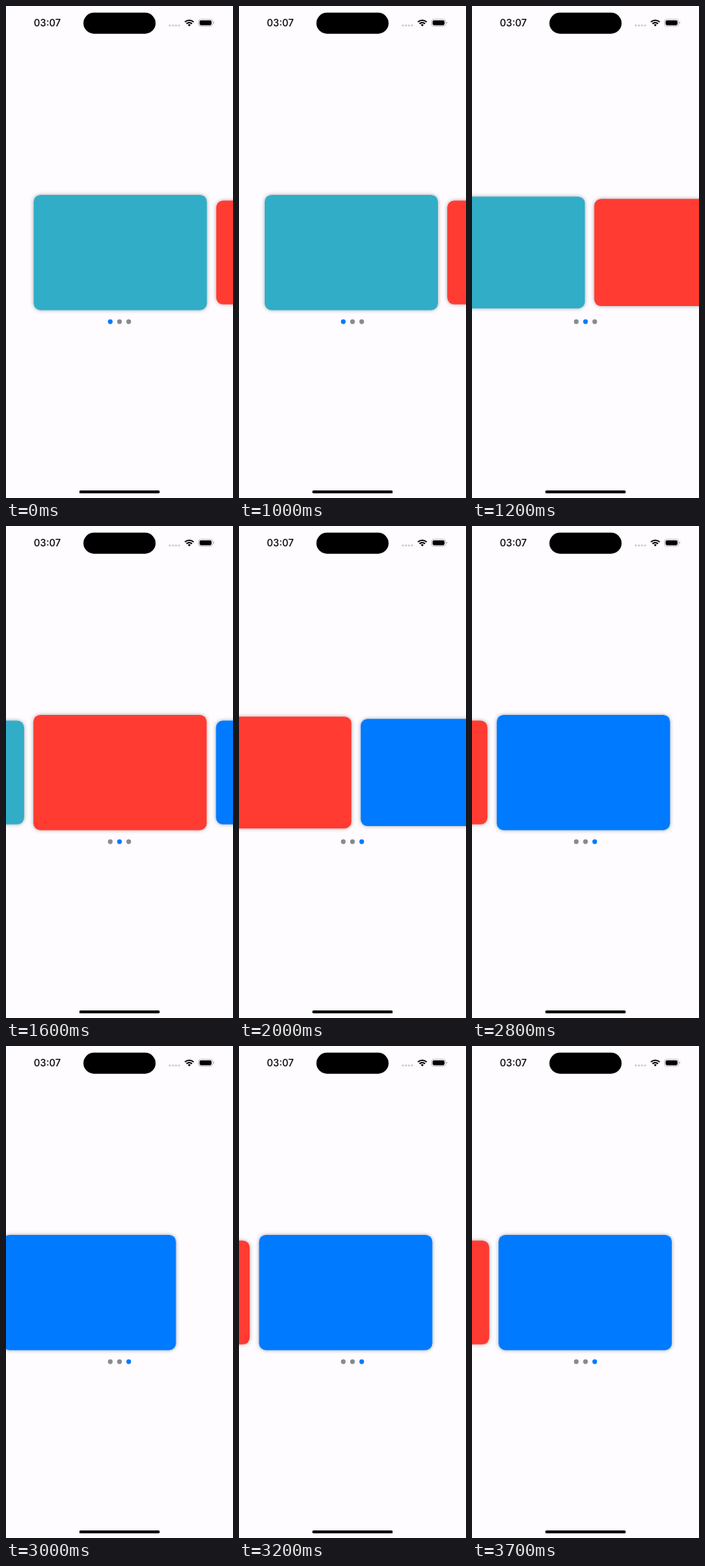
Write an HTML page that moves like this. It is 300 px wide and 651 px high and loops after 3900 ms.

```html
<!DOCTYPE html>
<html lang="en">
<head>
<meta charset="utf-8">
<title>Card carousel</title>
<style>
  html, body { margin: 0; width: 100%; height: 100%; overflow: hidden; background: #fefcff; }
  svg { display: block; width: 100%; height: 100%; }
  text { font: 500 12.8px Inter, Roboto, sans-serif; }
</style>
</head>
<body>
<svg viewBox="0 0 300 651">
  <defs>
    <filter id="shadow" x="-10%" y="-15%" width="120%" height="130%">
      <feDropShadow dx="0" dy="0" stdDeviation="2.6" flood-color="#000" flood-opacity=".36"/>
    </filter>
  </defs>
  <rect width="300" height="651" fill="#fefcff"/>

  <text x="54.6" y="27" text-anchor="middle">03:07</text>
  <rect x="102.3" y="8.8" width="95.4" height="27.9" rx="13.95"/>
  <g fill="#c9c8cb">
    <circle cx="216.5" cy="25.8" r="1.4"/>
    <circle cx="220.6" cy="25.8" r="1.4"/>
    <circle cx="224.6" cy="25.8" r="1.4"/>
    <circle cx="228.7" cy="25.8" r="1.4"/>
  </g>
  <g fill="none" stroke="#000" stroke-width="1.8">
    <path d="M236.4 21.2a8.2 8.2 0 0 1 11.6 0"/>
    <path d="M238.6 23.5a5.1 5.1 0 0 1 7.2 0"/>
  </g>
  <path d="M242.2 27l-1.9-2a2.7 2.7 0 0 1 3.8 0z"/>
  <rect x="254.4" y="17.6" width="18.6" height="9.2" rx="3" fill="none" stroke="#a9a8ab" stroke-width=".8"/>
  <rect x="255.8" y="19" width="15.8" height="6.4" rx="1.8"/>
  <path d="M274 20.8q1.2 .4 1.2 1.4t-1.2 1.4z" fill="#a9a8ab"/>

  <g id="cards"></g>
  <g id="dots"></g>
  <rect x="96.8" y="641" width="106.4" height="3.8" rx="1.9"/>
</svg>
<script>
const LOOP = 3900, TICK = 100;
const COLORS = ['#32adc7', '#ff3b30', '#007aff'];
const CARD = { x: 36.5, w: 229, h: 152.5, small: 137.2, gap: 241.3, cy: 326.2 };
const PAGE = 242;                       // scroll distance per page
const SWIPES = [965, 1765];             // finger-down times
const DRAG = 175, DRAG_PX = 64;
const PULL = { start: 2765, top: 3000, end: 3040, px: 39.5 };

const add = (parent, tag, attrs) => {
  const el = document.createElementNS('http://www.w3.org/2000/svg', tag);
  set(el, attrs);
  document.getElementById(parent).append(el);
  return el;
};
const set = (el, attrs) => {
  for (const k in attrs) el.setAttribute(k, attrs[k]);
};
const clamp = v => Math.min(1, Math.max(0, v));

// Critically damped spring from 0 to 1
const spring = ms => {
  const a = Math.max(0, ms) * 0.018;
  return 1 - (1 + a) * Math.exp(-a);
};

const cards = COLORS.map(fill => add('cards', 'rect', {
  fill, width: CARD.w, rx: 9, filter: 'url(#shadow)'
}));
const dots = COLORS.map((c, i) => add('dots', 'circle', {
  cx: 137.8 + 12.2 * i, cy: 417.7, r: 3.1
}));

function overscroll(t) {
  const k = clamp((t - PULL.start) / (PULL.top - PULL.start));
  return PULL.px * k * k * (3 - 2 * k) * (1 - spring(t - PULL.end));
}

function draw(t) {
  let scroll = overscroll(t), page = 0;
  const focus = [1, 0, 0];
  SWIPES.forEach((start, i) => {
    const release = start + DRAG;
    const snap = spring(t - release);
    const pulled = DRAG_PX * clamp((t - start) / DRAG) ** 2;
    scroll += pulled + (PAGE - DRAG_PX) * snap;
    focus[i] -= snap;
    focus[i + 1] += snap;
    if (t >= release) page = i + 1;
  });
  cards.forEach((card, i) => {
    const height = CARD.small + (CARD.h - CARD.small) * focus[i];
    set(card, { x: CARD.x + CARD.gap * i - scroll, y: CARD.cy - height / 2, height });
  });
  dots.forEach((dot, i) => set(dot, { fill: i === page ? '#007aff' : '#8a898d' }));
}

const began = performance.now();
function frame() {
  const t = (performance.now() - began) % LOOP;
  draw(Math.floor(t / TICK) * TICK);
  requestAnimationFrame(frame);
}
frame();
</script>
</body>
</html>
```
